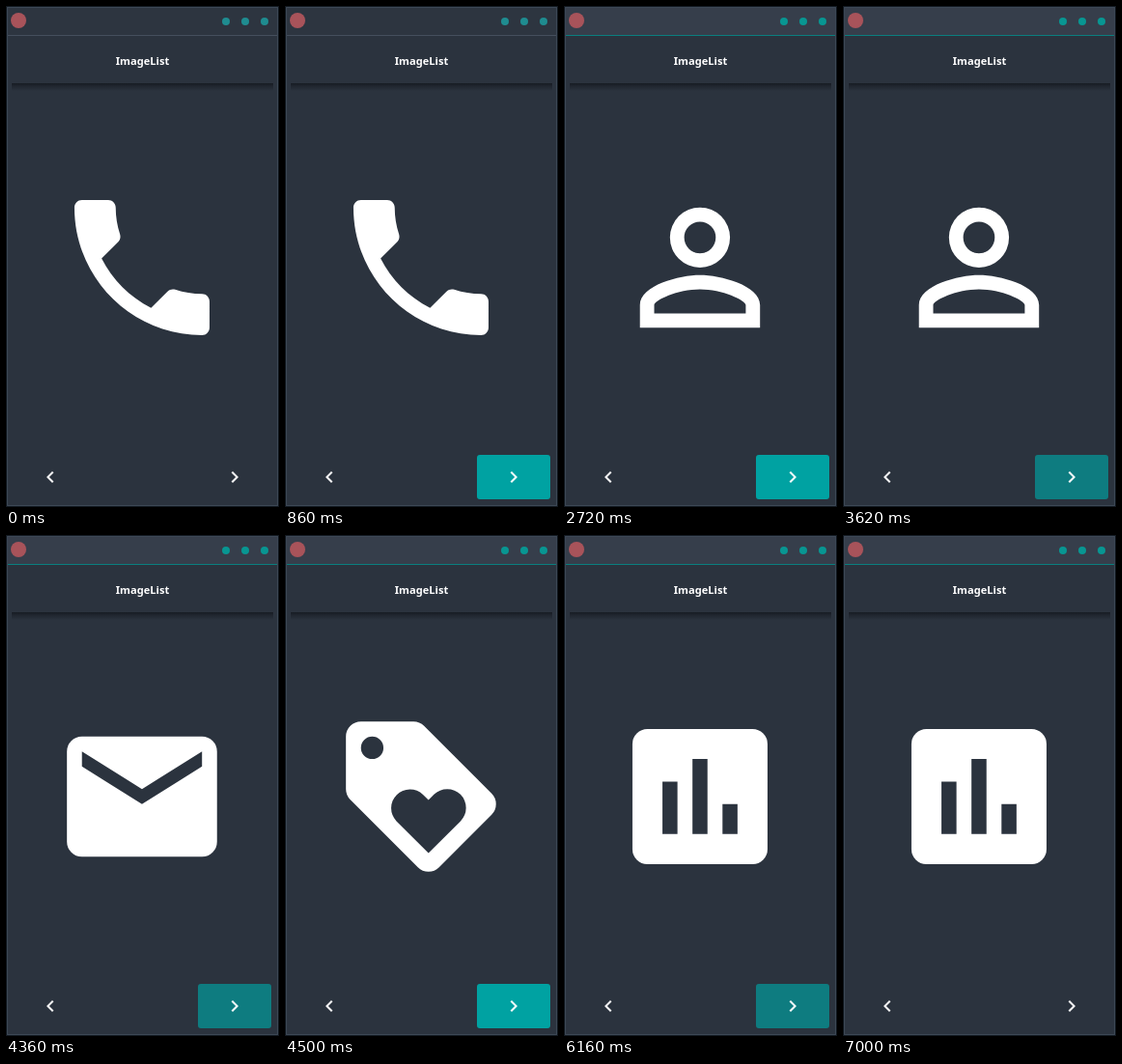
An HTML page for the animation above (8 s loop, 283 px wide and 519 px high).

```html
<!DOCTYPE html>
<html lang="en">
<head>
<meta charset="utf-8">
<title>ImageList</title>
<style>
  html, body { margin: 0; width: 100%; height: 100%; overflow: hidden; background: #2b333e; }
  svg { display: block; width: 283px; height: 519px; }
  .title { font: 700 11.1px "Noto Sans", "Open Sans", sans-serif; fill: #fff; text-anchor: middle; }
  .icon { fill: #fff; fill-rule: evenodd; visibility: hidden; }
  .bar, .rule, .dots, .next, .icon { animation: 8s step-end infinite; }

  .bar { animation-name: bar; }
  .rule { animation-name: rule; }
  .dots { animation-name: dots; }
  .next { animation-name: next; }
  .call { animation-name: call; }
  .person { animation-name: person; }
  .mail { animation-name: mail; }
  .tag { animation-name: tag; }
  .chart { animation-name: chart; }

  @keyframes bar { 0% { fill: #2d3540; } 32.25%, 100% { fill: #363e4b; } }
  @keyframes rule { 0% { fill: #454f5d; } 32.25%, 100% { fill: #0a7f7f; } }
  @keyframes dots { 0% { fill: #1f8c90; } 32.25%, 100% { fill: #089692; } }

  /* idle, hovered, then pressed once per step */
  @keyframes next {
    0%, 87.5%, 100% { fill: transparent; }
    10.75%, 34%, 47%, 56.25%, 65.375%, 79.375% { fill: #00a2a2; }
    32.25%, 45.25%, 54.5%, 63%, 77% { fill: #0e7c80; }
  }

  @keyframes call { 0% { visibility: visible; } 34%, 100% { visibility: hidden; } }
  @keyframes person { 0%, 47%, 100% { visibility: hidden; } 34% { visibility: visible; } }
  @keyframes mail { 0%, 56.25%, 100% { visibility: hidden; } 47% { visibility: visible; } }
  @keyframes tag { 0%, 65.375%, 100% { visibility: hidden; } 56.25% { visibility: visible; } }
  @keyframes chart { 0% { visibility: hidden; } 65.375%, 100% { visibility: visible; } }
</style>
</head>
<body>
<svg viewBox="0 0 283 519">
  <defs>
    <linearGradient id="shade" x2="0" y2="1">
      <stop stop-color="#171c23"/>
      <stop offset=".4" stop-color="#20262f"/>
      <stop offset="1" stop-color="#2b333e"/>
    </linearGradient>
  </defs>

  <rect width="283" height="519" fill="#141b23"/>
  <rect x="1" y="1" width="281" height="517" fill="#3d4856"/>
  <rect x="2" y="2" width="279" height="515" fill="#2b333e"/>
  <rect class="bar" x="2" y="2" width="279" height="28"/>
  <rect class="rule" x="2" y="30" width="279" height="1"/>

  <circle cx="13" cy="15" r="8" fill="#a8535a"/>
  <g class="dots">
    <circle cx="228" cy="16" r="4"/>
    <circle cx="248" cy="16" r="4"/>
    <circle cx="268" cy="16" r="4"/>
  </g>

  <rect x="6" y="80" width="271" height="8" fill="url(#shade)"/>
  <text class="title" x="141.5" y="61">ImageList</text>

  <g transform="translate(47.6 177.6) scale(7.78)">
    <path class="icon call" d="M6.62 10.79c1.44 2.83 3.76 5.14 6.59 6.59l2.2-2.2c.27-.27.67-.36 1.02-.24 1.12.37 2.33.57 3.57.57.55 0 1 .45 1 1V20c0 .55-.45 1-1 1-9.39 0-17-7.61-17-17 0-.55.45-1 1-1h3.5c.55 0 1 .45 1 1 0 1.25.2 2.45.57 3.57.11.35.03.74-.25 1.02z"/>
    <path class="icon person" d="M12 4a4 4 0 0 1 0 8 4 4 0 0 1 0-8zm0 1.9a2.1 2.1 0 0 0 0 4.2 2.1 2.1 0 0 0 0-4.2zM12 13c2.67 0 8 1.34 8 4v3H4v-3c0-2.66 5.33-4 8-4zm0 1.9c-2.97 0-6.1 1.46-6.1 2.1v1.1h12.2V17c0-.64-3.13-2.1-6.1-2.1z"/>
    <path class="icon mail" d="M4 4h16a2 2 0 0 1 2 2v12a2 2 0 0 1-2 2H4a2 2 0 0 1-2-2V6a2 2 0 0 1 2-2zm16 4V6l-8 5-8-5v2l8 5z"/>
    <path class="icon tag" d="M4 2h7a2 2 0 0 1 1.41.58l9 9a2 2 0 0 1 0 2.83l-7 7a2 2 0 0 1-2.82 0l-9-9A2 2 0 0 1 2 11V4a2 2 0 0 1 2-2zm1.5 2a1.5 1.5 0 0 0 0 3 1.5 1.5 0 0 0 0-3zM13 19.54l4.27-4.27A2.5 2.5 0 0 0 13.73 11.73l-.73.73-.73-.72A2.5 2.5 0 0 0 8.73 15.27z"/>
    <path class="icon chart" d="M5 3h14a2 2 0 0 1 2 2v14a2 2 0 0 1-2 2H5a2 2 0 0 1-2-2V5a2 2 0 0 1 2-2zm2 7v7h2v-7zm4-3v10h2V7zm4 6v4h2v-4z"/>
  </g>

  <rect class="next" x="199" y="465" width="76" height="46" rx="3"/>
  <g fill="#fff">
    <path d="M49.41 483.41 48 482l-6 6 6 6 1.41-1.41L44.83 488z"/>
    <path d="M235 482l-1.41 1.41 4.58 4.59-4.58 4.59L235 494l6-6z"/>
  </g>
</svg>
</body>
</html>
```
